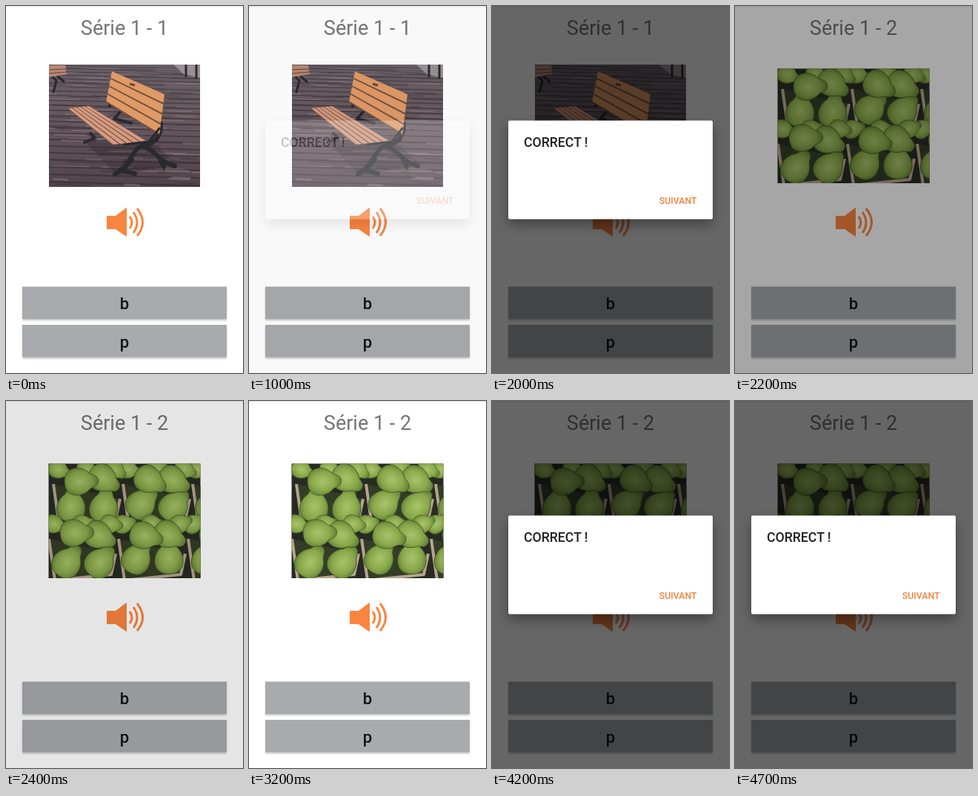
An HTML page that plays this animation: 320 by 495 pixels, repeating every 4800 ms.

```html
<!DOCTYPE html>
<html lang="fr">
<head>
<meta charset="utf-8">
<title>Série</title>
<style>
html, body { margin: 0; width: 100%; height: 100%; overflow: hidden; background: #fff; }
svg { display: block; width: 320px; height: 495px; font-family: Roboto, sans-serif; }
text { text-anchor: middle; }
.title { font-size: 27px; fill: #757575; }
.key { font-size: 22px; font-weight: 500; fill: #111; }
.bar { fill: #a9aaae; filter: drop-shadow(0 2px 1px rgba(0, 0, 0, .24)); }
.panel { fill: #fff; filter: drop-shadow(0 7px 8px rgba(0, 0, 0, .36)); }
.iron { fill: none; stroke: #2a292f; stroke-linecap: round; stroke-linejoin: round; }
.rim { fill: #343d27; stroke: #b5a48d; stroke-width: 4; stroke-linejoin: round; }
#one, #two { animation: 4.8s step-end infinite; }
#one { animation-name: first; }
#two { animation-name: second; }
@keyframes first { 43.74%, 100% { visibility: hidden } }
@keyframes second { 0% { visibility: hidden } 43.74%, 100% { visibility: visible } }
</style>
</head>
<body>
<svg viewBox="0 0 320 495">
  <defs>
    <linearGradient id="deck" x2="0" y2="1">
      <stop offset="0" stop-color="#675f66"/>
      <stop offset=".5" stop-color="#64565c"/>
      <stop offset="1" stop-color="#51434a"/>
    </linearGradient>
    <radialGradient id="skin" cx=".45" cy=".5" r=".62">
      <stop offset="0" stop-color="#a9c46b"/>
      <stop offset=".55" stop-color="#8aa94b"/>
      <stop offset="1" stop-color="#54712e"/>
    </radialGradient>
    <path id="pear" d="M-1 0C-1 -1.2 .3 -1.15 .8 -.55C1.05 -.4 1.4 -.4 1.4 0C1.4 .4 1.05 .4 .8 .55C.3 1.15 -1 1.2 -1 0Z"
      fill="url(#skin)" stroke="#3d5423" stroke-width=".04"/>
    <clipPath id="benchFrame"><rect x="58" y="79" width="204" height="165"/></clipPath>
    <clipPath id="pearFrame"><rect x="57.5" y="84.5" width="205" height="154.5"/></clipPath>
  </defs>

  <rect width="320" height="495" fill="#fff"/>
  <rect width="320" height="1.5" fill="#ededed"/>

  <g id="one">
    <text class="title" x="160" y="39">Série 1 - 1</text>
    <g clip-path="url(#benchFrame)">
      <rect x="58" y="79" width="204" height="165" fill="url(#deck)"/>
      <g id="planks"></g>
      <path d="M226 79H262V97L240 92Z" fill="#989095"/>
      <path class="iron" stroke-width="3" d="M243 79V95M257 79V97M60 92L68 101L64 116M70 95L78 102"/>
      <path d="M58 80H80L82 92L58 96Z" fill="#b98773"/>
      <path d="M58 86L81 85M58 91L82 89" stroke="#5d4640"/>
      <path d="M108 184L150 178L205 190L232 214L150 229Z" fill="#30262d" opacity=".35"/>
      <path class="iron" stroke-width="4" d="M114 172L120 178L106 184M154 143L146 152L169 158"/>
      <path class="iron" stroke-width="6" d="M209 158C211 177 196 188 186 188C171 190 170 213 147 227M187 190C202 194 207 211 228 216M170 207L157 222L174 226M206 203L213 217"/>
      <g id="slats"></g>
      <path class="iron" stroke-width="3" d="M160 187L193 183L207 165"/>
      <path d="M167 105L174 107" stroke="#6d4733" stroke-width="3"/>
    </g>
  </g>

  <g id="two">
    <text class="title" x="160" y="39">Série 1 - 2</text>
    <g clip-path="url(#pearFrame)">
      <rect x="57" y="84" width="206" height="156" fill="#272b24"/>
      <g id="crates"></g>
    </g>
  </g>

  <g fill="#fa853f" stroke="#fa853f">
    <path d="M136.5 283.5H148L162.5 272.5V310.5L148 300.5H136.5Z" stroke-linejoin="round"/>
    <path d="M167 284Q173 292 167 300M172 278Q182 292 172 306M177 273Q192 292 177 310" fill="none" stroke-width="3"/>
  </g>

  <rect class="bar" x="22" y="378.5" width="276" height="43.5"/>
  <rect class="bar" x="22" y="430" width="276" height="43.5"/>
  <text class="key" x="160" y="409">b</text>
  <text class="key" x="160" y="460.5">p</text>

  <rect id="dim" width="320" height="495" opacity="0"/>

  <g id="dialog" font-weight="500" opacity="0">
    <rect class="panel" x="22" y="154.5" width="276" height="133" rx="2"/>
    <text x="43" y="190" font-size="17.7" fill="#222" style="text-anchor: start">CORRECT !</text>
    <text x="276.5" y="267" font-size="12.3" fill="#f5813e" style="text-anchor: end">SUIVANT</text>
  </g>
</svg>
<script>
const byId = id => document.getElementById(id);
const clamp = v => Math.min(1, Math.max(0, v));
const smooth = v => (v = clamp(v)) * v * (3 - 2 * v);
const mix = (a, b, k) => a.map((v, i) => v + (b[i] - v) * k);

let seed = 7;
const random = () => (seed = seed * 16807 % 2147483647) / 2147483647;
const spread = size => (random() * 2 - 1) * size;

// Boards of a four-cornered panel, listed clockwise from the top left.
const boards = ([a, b, c, d], count, gap, fill) => {
  let out = `<polygon points="${[a, b, c, d].join(' ')}" fill="#74503f"/>`;
  for (let i = 0; i < count; i++) {
    const top = i / count, end = (i + 1 - gap) / count;
    const points = [mix(a, d, top), mix(b, c, top), mix(b, c, end), mix(a, d, end)];
    out += `<polygon points="${points.join(' ')}" fill="${fill}"/>`;
  }
  return out;
};
byId('slats').innerHTML =
  '<path class="iron" stroke-width="4" d="M147 91L140 135M211 119L204 181"/>' +
  boards([[112, 135], [189, 182], [143, 187], [83, 138]], 5, .2, '#d59a80') +
  boards([[143, 88], [214, 119], [207, 174], [135, 130]], 4, .16, '#df9a66');

// Seams widen toward the viewer, with worn streaks between them.
let planks = '';
for (let y = 80, gap = 4; y < 246; y += gap, gap += .3) {
  planks += `<path d="M58 ${y}L262 ${y + 5}" stroke="#372e35" stroke-width="${gap / 5}" opacity=".7"/>`;
  for (let i = 0; i < 5; i++) {
    const x = 40 + random() * 200, top = y + gap * random() + (x - 58) / 40;
    planks += `<path d="M${x} ${top}l${20 + random() * 40} 1" stroke="${i % 2 ? '#43373d' : '#8d7c83'}"
      stroke-width="${gap / 4}" opacity=".5"/>`;
  }
}
byId('planks').innerHTML = planks;

const pear = (x, y, r, turn) =>
  `<use href="#pear" transform="translate(${x} ${y}) rotate(${turn}) scale(${r})"/>`;

// A crate: small pears behind, two lying on top and two upright in front.
const crate = (x, y) => {
  let out = `<path class="rim" transform="translate(${x} ${y})" d="M-44 -12L-36 44L40 36L46 8"/>`;
  for (const dx of [-38, 0, 38]) out += pear(x + dx, y - 32, 13, spread(40));
  for (const dx of [24, -20]) out += pear(x + dx, y + 18 + spread(3), 20, -65 + spread(25));
  for (const dx of [22, -10]) out += pear(x + dx, y - 18 + spread(3), 19, 15 + spread(20));
  return out;
};
let crates = '';
for (let row = 0; row < 2; row++)
  for (let col = 2; col >= 0; col--) crates += crate(108 + 94 * col - 6 * row, 124 + 74 * row);
byId('crates').innerHTML = crates;

// The dialog opens at 1000 and 3900 ms and closes at 2000 ms, in steps of 100 ms.
const loop = 4800, step = 100, close = 2000;
function draw(now) {
  const t = Math.floor((now % loop + .5) / step) * step;
  const opened = t - (t < 3900 ? 1000 : 3900) + 40;
  const closed = t < 3900 ? t - close : 0;
  const shown = t < 1000 || (t > 2500 && t < 3900) ? 0 : 1;
  byId('dim').setAttribute('opacity', shown * .6 * smooth(opened / 350) * clamp(1 - closed / 480));
  byId('dialog').setAttribute('opacity', shown * clamp(opened / 170) * clamp(1 - closed / 170));
  requestAnimationFrame(draw);
}
requestAnimationFrame(draw);
</script>
</body>
</html>
```
